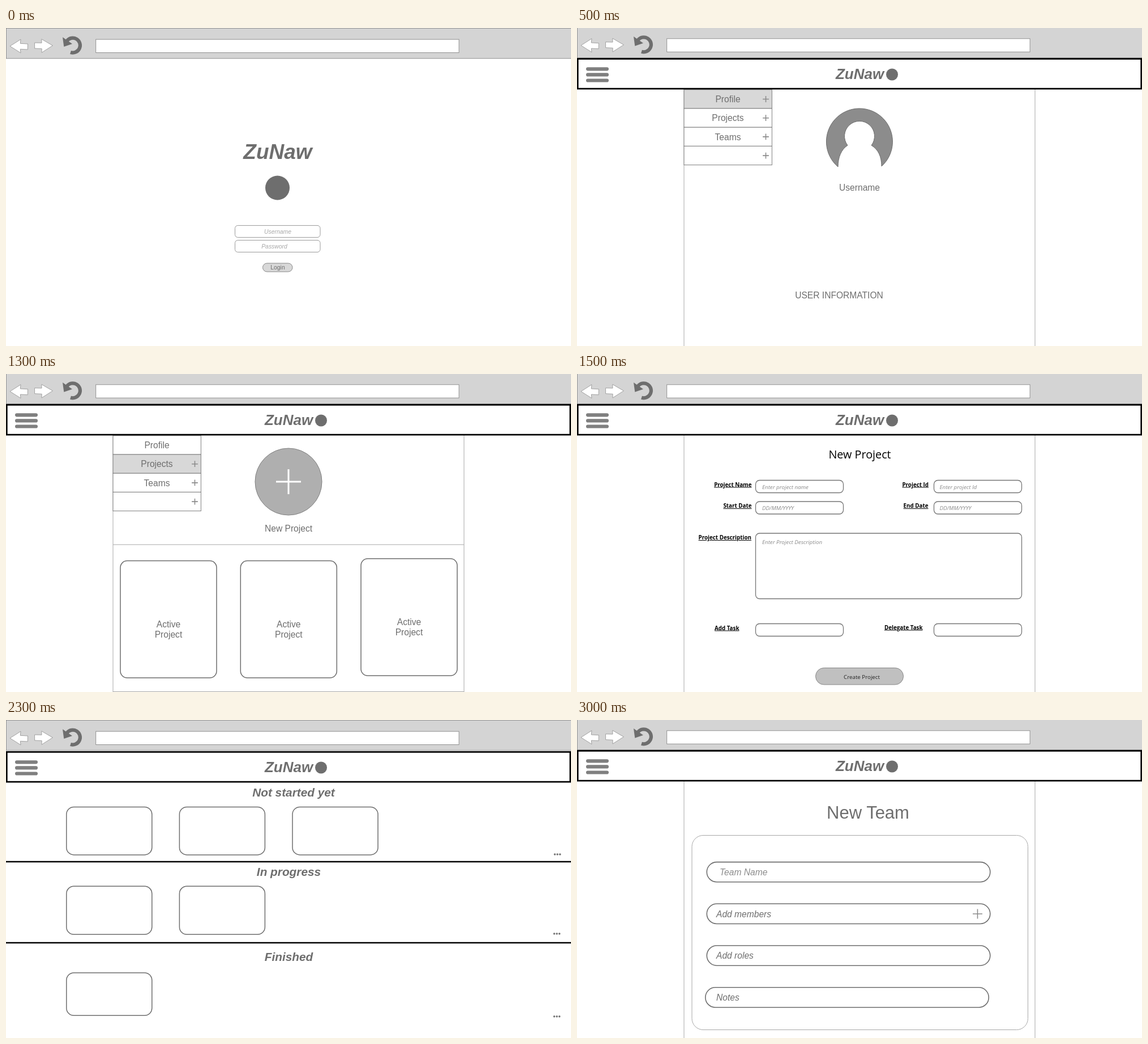
An HTML page for the animation above (3500 ms loop, 998 by 561 pixels).

```html
<!DOCTYPE html>
<html lang="en">
<head>
<meta charset="utf-8">
<title>Task planner wireframe</title>
<style>
html, body { margin: 0; width: 100%; height: 100%; overflow: hidden; background: #fff; }
svg { display: block; width: 998px; height: 561px; font: 15.6px "Liberation Sans", Arial, sans-serif; }
text { fill: #6e6e6e; }
.i { font-style: italic; }
.b { font-weight: bold; }
.open { font-family: "Open Sans", "Noto Sans", sans-serif; }
.label { font-weight: bold; text-decoration: underline; }
</style>
</head>
<body>
<svg id="stage" viewBox="0 0 998 561"></svg>
<script>
const GREY = '#6e6e6e', MID = '#8c8c8c', PALE = '#a8a8a8';
const BRAND = 'ZuNaw';

const rect = (x, y, w, h, r = 0, stroke = GREY, width = 1.5, fill = '#fff') =>
  `<rect x="${x}" y="${y}" width="${w}" height="${h}" rx="${r}" fill="${fill}" stroke="${stroke}" stroke-width="${width}"/>`;
const path = (d, stroke, width = 1, fill = 'none') =>
  `<path d="${d}" fill="${fill}" stroke="${stroke}" stroke-width="${width}"/>`;
const circle = (x, y, r, fill, stroke = 'none') =>
  `<circle cx="${x}" cy="${y}" r="${r}" fill="${fill}" stroke="${stroke}"/>`;
const text = (str, x, y, { size = 15.6, cls = '', fill = GREY, anchor = 'middle' } = {}) =>
  `<text x="${x}" y="${y}" class="${cls}" text-anchor="${anchor}" style="font-size:${size}px;fill:${fill}">${str}</text>`;
const plus = (x, y, r, width = 1.6, stroke = MID) =>
  path(`M${x - r} ${y}h${2 * r}M${x} ${y - r}v${2 * r}`, stroke, width);
const shift = (dy, body) => `<g transform="translate(0 ${dy})">${body}</g>`;

const browserBar = dy => shift(dy,
  rect(0.4, 0.4, 1000, 53.4, 0, '#888', 0.9, '#d4d4d4') +
  rect(158.7, 20.1, 641.4, 23.4, 0, '#888', 0.9) +
  path('M7 32 26 20 25.3 27.3 38.5 28 38.3 38 25.3 37.3 26 44Z', '#999', 0.9, '#fff') +
  path('M50.6 26 63 26.3 62.8 19.6 82.5 31 63 43.4 63.2 36.6 50.6 36Z', '#999', 0.9, '#fff') +
  path('M107.5 22.8A13 13 0 1 1 114 43', GREY, 6.2) +
  path('M100 16.2 102.3 33 117 28Z', 'none', 0, GREY));

const header = dy => shift(dy,
  rect(1.3, 54.4, 995.4, 52.7, 0, '#000', 2.7) +
  [72.3, 82.4, 92.5].map(y => rect(16, y - 3.1, 40, 6.2, 3.1, 'none', 0, '#7f7f7f')).join('') +
  text(BRAND, 499.5, 90, { size: 26, cls: 'b i' }) +
  circle(556.5, 82, 10.5, GREY));

const page = body => browserBar(-1.3) + path('M189 108V561M809 108V561', PALE) + body + header(0);

const menu = (selected, plusFrom) => ['Profile', 'Projects', 'Teams', ''].map((name, i) => {
  const y = 108.8 + 33.2 * i;
  return rect(189, y, 155.4, 33.2, 0, '#808080', 1, i === selected ? '#d8d8d8' : '#fff') +
    text(name, 266.5, y + 22.3) + (i >= plusFrom ? plus(333.5, y + 16.7, 5.4) : '');
}).join('');

// Each card: x, y, first text baseline
const overview = (kind, cards) => page(
  menu(1, 1) +
  circle(499, 190, 59, '#afafaf', '#808080') + plus(499, 190, 22, 3, '#fff') +
  text('New ' + kind, 499, 277.5) +
  path('M189 301H809M189 560.5H809', PALE) +
  cards.map(([x, y, base]) => rect(x, y, 170, 206.5, 12) +
    text('Active', x + 85, base) + text(kind, x + 85, base + 17.8)).join(''));

const login = () => {
  const hint = { size: 10.4, cls: 'i', fill: PALE };
  return browserBar(0) +
    text(BRAND, 480, 231, { size: 37, cls: 'b i' }) + circle(479.5, 282, 21.5, GREY) +
    rect(404.5, 348.4, 150.5, 21, 5, '#999', 1) + text('Username', 480, 362.5, hint) +
    rect(404.5, 374.4, 150.5, 21, 5, '#999', 1) + text('Password', 474, 388.5, hint) +
    rect(453.5, 415, 52.5, 15, 7.5, '#888', 1, '#d8d8d8') + text('Login', 480, 426, { size: 10.4 });
};

const profile = () => page(
  menu(0, 0) +
  path('M461 245A58.5 58.5 0 1 1 538 244C538 227 532 214 520 207A26.5 26.5 0 1 0 478 207C467 214 461 228 461 245Z', GREY, 1, MID) +
  text('Username', 499, 286.5) + text('USER INFORMATION', 463, 477));

const projectForm = () => {
  const label = (str, x, y) => text(str, x, y, { size: 9.8, cls: 'open label', fill: '#000', anchor: 'end' });
  const field = (x, y, hint, w = 155, h = 22) => rect(x, y, w, h, 7, '#757575', 1.3) +
    text(hint, x + (x < 400 ? 11.5 : 10), y + 15.4, { size: 9.8, cls: 'open i', fill: MID, anchor: 'start' });
  return page(
    text('New Project', 499.5, 148.5, { size: 19.8, cls: 'open', fill: '#000' }) +
    label('Project Name', 308.5, 198.5) + field(315.5, 187.5, 'Enter project name') +
    label('Project Id', 621, 198.5) + field(630.5, 187.5, 'Enter project Id') +
    label('Start Date', 308.5, 236) + field(315.5, 225, 'DD/MM/YYYY') +
    label('End Date', 620.5, 236) + field(630.5, 225, 'DD/MM/YYYY') +
    label('Project Description', 308, 292) +
    shift(0, field(315.5, 281, '', 470, 115.5)) +
    text('Enter Project Description', 327, 299.5, { size: 9.8, cls: 'open i', fill: MID, anchor: 'start' }) +
    label('Add Task', 286.5, 451.5) + field(315.5, 440.5, '') +
    label('Delegate Task', 610.5, 450.5) + field(630.5, 440.5, '') +
    rect(421.5, 518.5, 155, 29.5, 14.7, '#888', 1, '#c0c0c0') +
    text('Create Project', 503, 537.5, { size: 9.75, cls: 'open', fill: '#222' }));
};

const board = () => {
  const lane = (title, x, base, count, y, h, dotX, dotY) =>
    text(title, x, base, { size: 20.8, cls: 'b i' }) +
    Array.from({ length: count }, (_, i) => rect(106.8 + 199.6 * i, y, 151, h, 13)).join('') +
    [-4.6, 0, 4.6].map(dx => circle(dotX + dx, dotY, 1.8, '#757575')).join('');
  return browserBar(0) + header(2) +
    lane('Not started yet', 508, 135, 3, 153.4, 84.5, 974, 237) +
    lane('In progress', 499.5, 275, 2, 293.3, 85, 973, 377) +
    lane('Finished', 499.5, 425, 1, 446, 75.3, 973, 523) +
    path('M0 250H998M0 393H998', '#000', 2.7);
};

const teamForm = () => {
  const pill = (x, y, hint, textX, fill) => rect(x, y, 500.5, 35.2, 17.6, GREY, 1.6) +
    text(hint, textX, y + 23.4, { cls: 'i', fill, anchor: 'start' });
  return page(
    text('New Team', 514, 174, { size: 31 }) +
    rect(203, 203.5, 593.5, 343, 20, PALE, 1) +
    pill(229.3, 250.6, 'Team Name', 252, MID) +
    pill(229.3, 324.3, 'Add members', 246) + plus(707.5, 342, 8.5) +
    pill(229.3, 398, 'Add roles', 246) +
    pill(226.8, 471.8, 'Notes', 246));
};

const screens = [
  login(),
  profile(),
  overview('Project', [[202, 329.6, 447], [414.3, 329.6, 447], [627, 325.7, 443.3]]),
  projectForm(),
  board(),
  overview('Team', [[210, 324.6, 442], [414.3, 330.6, 448], [618.6, 330.6, 464]]),
  teamForm()
];

const HOLD = 500;
const stage = document.getElementById('stage');
stage.innerHTML = screens.map(body => `<g display="none">${body}</g>`).join('');
const groups = [...stage.children];

function draw(now) {
  const current = Math.floor(now / HOLD) % groups.length;
  groups.forEach((group, i) => group.setAttribute('display', i === current ? 'inline' : 'none'));
}
function tick() {
  draw(performance.now() - start);
  requestAnimationFrame(tick);
}
const start = performance.now();
tick();
</script>
</body>
</html>
```
